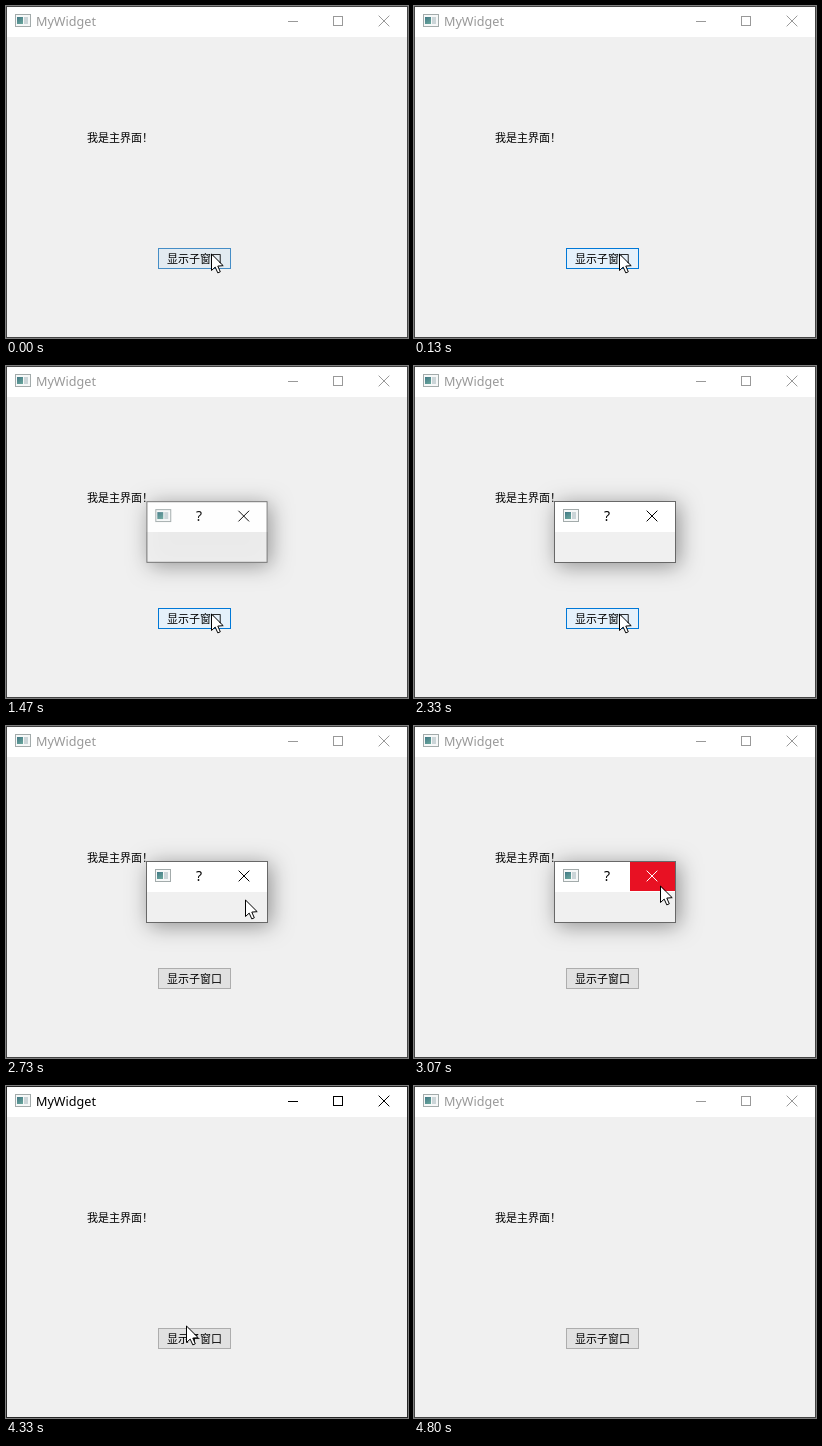
An HTML page with a canvas for the animation above (4940 ms loop, 402 by 332 pixels).

```html
<!DOCTYPE html>
<html lang="zh-CN">
<head>
<meta charset="utf-8">
<style>
html, body { margin: 0; width: 100%; height: 100%; overflow: hidden; }
canvas { display: block; width: 402px; height: 332px; }
</style>
</head>
<body>
<canvas id="stage" width="402" height="332"></canvas>
<script>
const c = document.getElementById('stage').getContext('2d');
const LOOP = 4940, TICK = 200 / 3;
const UI = '12.6px "Noto Sans", sans-serif';
const CJK = '11px "Noto Sans CJK SC", "Noto Sans CJK", sans-serif';

// Button colours: plain, hovered, pressed
const FILL = [[225, 225, 225], [229, 241, 251], [204, 228, 247]];
const EDGE = [[173, 173, 173], [0, 120, 215], [0, 84, 153]];

const lerp = (a, b, p) => a + (b - a) * p;
const ramp = (k, from, to) => Math.max(0, Math.min(1, (k - from) / (to - from)));
const easeOut = p => 1 - (1 - p) ** 2;

function shade(list, level) {
  const i = level < 1 ? 0 : 1;
  return `rgb(${list[i].map((v, n) => Math.round(lerp(v, list[i + 1][n], level - i)))})`;
}

function rect(x, y, w, h, color) {
  c.fillStyle = color;
  c.fillRect(x, y, w, h);
}

function frame(x, y, w, h, color) {
  c.strokeStyle = color;
  c.lineWidth = 1;
  c.strokeRect(x + .5, y + .5, w - 1, h - 1);
}

function text(str, x, y, font, color) {
  c.font = font;
  c.fillStyle = color;
  c.fillText(str, x, y);
}

function cross(x, y, color) {
  c.strokeStyle = color;
  c.lineWidth = 1;
  c.lineCap = 'square';
  c.beginPath();
  c.moveTo(x - 5, y - 5); c.lineTo(x + 5, y + 5);
  c.moveTo(x + 5, y - 5); c.lineTo(x - 5, y + 5);
  c.stroke();
}

function icon(x, y) {
  rect(x, y, 16, 13, '#f6f8f8');
  frame(x, y, 16, 13, '#a3abab');
  const g = c.createLinearGradient(x + 2, y + 3, x + 7, y + 11);
  g.addColorStop(0, '#417885');
  g.addColorStop(1, '#6caa9e');
  rect(x + 2, y + 3, 6, 7, g);
  rect(x + 9, y + 3, 4, 7, '#cbd5d8');
}

function mainWindow(active, level) {
  const ink = active ? '#000' : '#999';
  rect(0, 0, 402, 332, '#f0f0f0');
  rect(0, 0, 402, 31, '#fff');
  frame(0, 0, 402, 332, active ? '#262626' : '#444');
  icon(9, 8);
  text('MyWidget', 30, 20, UI, ink);
  rect(282, 15, 10, 1, ink);
  frame(327, 10, 10, 10, ink);
  cross(378, 15, ink);
  text('我是主界面！', 81, 136, CJK, '#000');
  rect(152, 242, 73, 21, shade(FILL, level));
  frame(152, 242, 73, 21, shade(EDGE, level));
  text('显示子窗口', 161, 257, CJK, '#000');
}

function dialog(show, hot, pressed) {
  const s = lerp(.9, 1, show);
  c.save();
  c.globalAlpha = show;
  c.translate(201, 166);
  c.scale(s, s);
  c.translate(-201, -166);
  c.save();
  c.shadowColor = 'rgba(0,0,0,.4)';
  c.shadowBlur = 21;
  c.shadowOffsetX = c.shadowOffsetY = 3;
  rect(140, 135, 122, 62, '#f0f0f0');
  c.restore();
  rect(140, 135, 122, 31, '#fff');
  icon(149, 143);
  text('?', 190, 155, '500 14px "Noto Sans", sans-serif', '#000');
  if (hot > 0) rect(216, 136, 45, 29, pressed ? '#f1707a' : `rgba(232,17,35,${hot})`);
  cross(238, 150, hot > .4 ? '#fff' : '#000');
  frame(140, 135, 122, 62, '#686868');
  c.restore();
}

function pointer(x, y) {
  c.save();
  c.translate(Math.round(x) + .5, Math.round(y) + .5);
  c.fillStyle = '#fff';
  c.strokeStyle = '#000';
  c.lineWidth = 1;
  const arrow = new Path2D('M0 0V16L3.7 12.6 6.3 18.4 8.8 17.3 6.3 11.6 11.2 11.2Z');
  c.fill(arrow);
  c.stroke(arrow);
  c.restore();
}

function draw(now) {
  const k = Math.floor((now % LOOP + 4) / TICK) % 74;
  const open = k >= 20 && k < 58;
  const active = k >= 17 && k < 72 && !open;
  // hover in, press, release, leave
  const level = .6 + .4 * ramp(k, 0, 2) + ramp(k, 16, 18) - ramp(k, 19, 22);
  mainWindow(active, level * (1 - ramp(k, 36, 39)));
  if (open) dialog(easeOut(ramp(k, 19, 23)), ramp(k, 42, 46), k >= 56);

  const rise = easeOut(ramp(k, 35, 45)), exit = ramp(k, 62, 68);
  if (k < 69) pointer(205 + 41 * rise - 156 * exit ** 1.25, 248 - 88 * rise + 160 * exit);
}

const start = performance.now();
function tick() {
  draw(performance.now() - start);
  requestAnimationFrame(tick);
}
tick();
</script>
</body>
</html>
```
